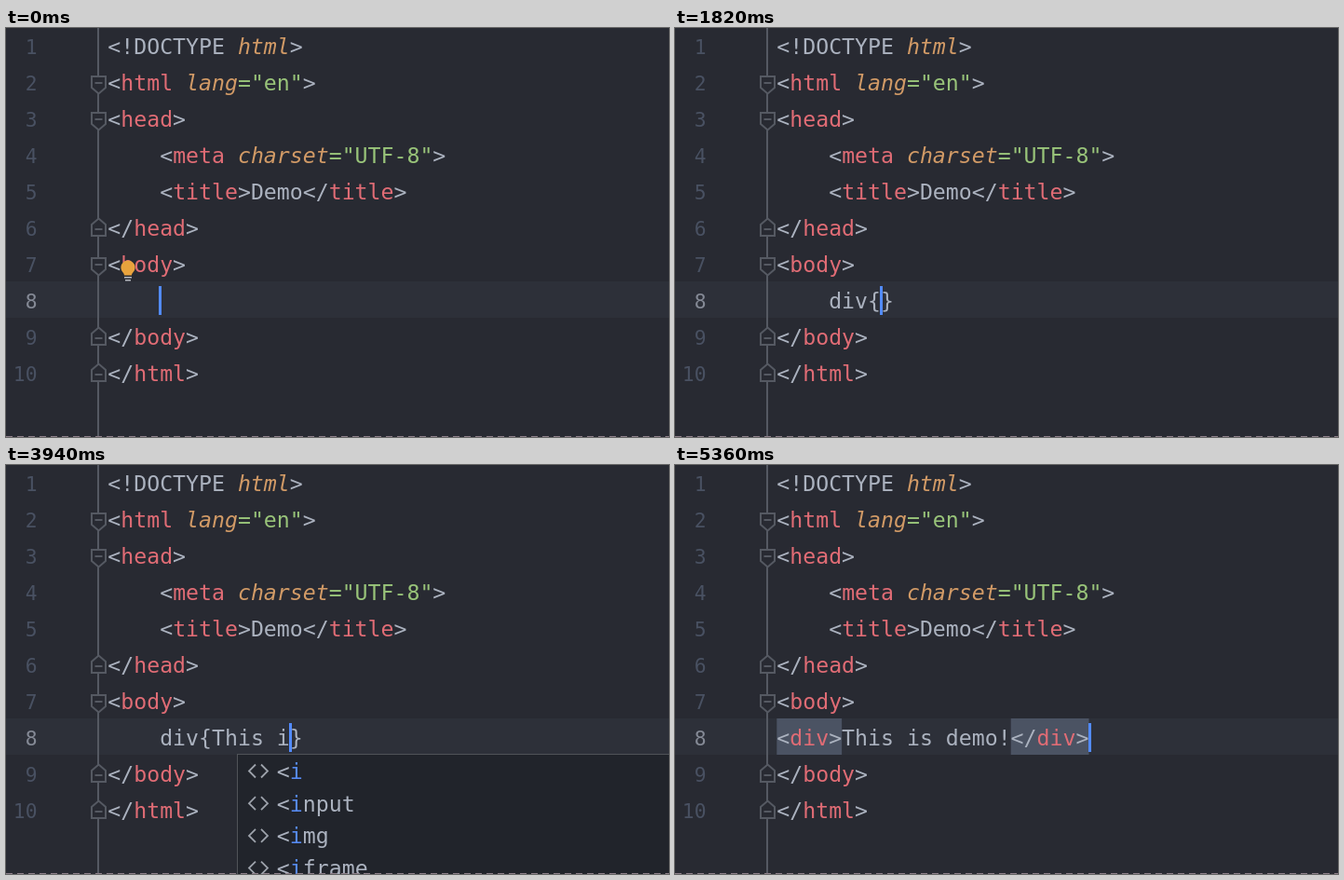
Write an HTML page that moves like this. It is 712 px wide and 439 px high and loops after 5560 ms.

```html
<!DOCTYPE html>
<html lang="en">
<head>
<meta charset="UTF-8">
<title>Editor abbreviation demo</title>
<style>
  html, body { margin: 0; width: 100%; height: 100%; overflow: hidden; background: #282a32; }
  svg { display: block; width: 712px; height: 439px; }
  text { white-space: pre; font: 23.2px "DejaVu Sans Mono", monospace; fill: #abb2bf; }
  .tag { fill: #e06c75; }
  .attr { fill: #d19a66; font-style: italic; }
  .str { fill: #98c379; }
  .key { fill: #568af2; }
  .dim { fill: #7d828c; }
  .num { font-size: 21.3px; fill: #495162; text-anchor: end; }
  .num.now { fill: #858a96; }
  .hint { font: 15.6px "Open Sans", sans-serif; fill: #5c6069; }
  .tip { fill: #5c94f5; }
  .line { fill: none; stroke: #9da2ab; stroke-width: 1.8; }
  .fold { fill: #282a32; stroke: #555962; stroke-width: 2; }
</style>
</head>
<body>
<svg id="stage" viewBox="0 0 712 439">
  <rect width="712" height="439" fill="#282a32"/>
  <rect y="272" width="712" height="39" fill="#2d3039"/>
  <path d="M99 0V439" class="fold"/>
  <g id="gutter"></g>
  <g id="code"></g>
  <g id="marks"></g>
  <text id="typed" y="301"></text>
  <g id="bulb">
    <path d="M127 265.5C127 262.5 123.4 261.500 123.400 257A7.600 7.600 0 0 1 138.600 257C138.600 261.500 135 262.500 135 265.500Z" fill="#e8a33d"/>
    <path d="M127 267.700H135M128 270.700H134" stroke="#b4b8bf" stroke-width="1.600"/>
  </g>
  <rect id="caret" y="277" width="3" height="31" fill="#528bff"/>
  <g id="popup"></g>
  <path d="M0 438.500H712" stroke="#8d7f89" stroke-width="1" stroke-dasharray="7 5"/>
</svg>
<script>
const LOOP = 5560, LEFT = 109.3, PITCH = 13.967, ROW = 39, ITEM = 34.7;
const byId = id => document.getElementById(id);
const colX = col => LEFT + col * PITCH;
const escape = s => s.replace(/&/g, "&amp;").replace(/</g, "&lt;");
const span = (cls, s) => `<tspan class="${cls}">${escape(s)}</tspan>`;
const text = (x, y, body, cls = "") => `<text x="${x}" y="${y}" class="${cls}">${body}</text>`;

// Colours tag names, attribute names and attribute values
function paint(src) {
  const parts = src.match(/<!DOCTYPE|<\/?|[\w-]+(?==)|="[^"]*"|\w+|\s+|./g);
  let inTag = false, last = "", doc = false;
  return parts.map(p => {
    let cls = "";
    if (p[0] === "<") { inTag = true; doc = p.length > 2; }
    else if (p === ">") inTag = false;
    else if (p[0] === "=") cls = "str";
    else if (inTag && p.trim()) cls = last[0] === "<" && !doc ? "tag" : "attr";
    last = p;
    return cls ? span(cls, p) : escape(p);
  }).join("");
}

const lines = [
  "<!DOCTYPE html>", '<html lang="en">', "<head>", '    <meta charset="UTF-8">',
  "    <title>Demo</title>", "</head>", "<body>", "", "</body>", "</html>"
];
const opens = [2, 3, 7], closes = [6, 9, 10];

byId("code").innerHTML = lines.map((s, i) => {
  const indent = s.length - s.trimStart().length;
  return s ? text(colX(indent), 28 + i * ROW, paint(s.trim())) : "";
}).join("");

function fold(row, dir) {
  const y = 20 + (row - 1) * ROW;
  const shape = dir > 0 ? `M92 ${y - 7}H107V${y + 5}L99.5 ${y + 11.5}L92 ${y + 5}Z`
                        : `M92 ${y + 8}H107V${y - 4}L99.5 ${y - 10.5}L92 ${y - 4}Z`;
  return `<path class="fold" d="${shape}M95.5 ${dir > 0 ? y : y + 1}h8"/>`;
}
byId("gutter").innerHTML =
  lines.map((s, i) => text(33.5, 28 + i * ROW, i + 1, i === 7 ? "num now" : "num")).join("") +
  opens.map(r => fold(r, 1)).join("") + closes.map(r => fold(r, -1)).join("");

const tagIcon = (x, y) =>
  `<path class="line" d="M${x + 20} ${y - 7}l-7 7l7 7m6 -14l7 7l-7 7"/>`;
const stampIcon = (x, y) =>
  `<path fill="#8b9099" d="M${x + 18} ${y - 9}h10v4h-3v4h8v5h-20v-5h8v-4h-3zM${x + 13} ${y + 7}h20v2.500h-20z"/>`;

// Completion list, aligned so that its words start at the given column
function popupSvg({ col, key, items, hint }) {
  const x = Math.floor(colX(col) - 42) + 0.5;
  const end = 310 + items.length * ITEM;
  let out = `<rect x="${x}" y="310.5" width="800" height="${hint ? end + 37.5 - 310 : 300}" fill="#21242b" stroke="#505358"/>`;
  items.forEach((word, i) => {
    const y = 328.5 + i * ITEM, stamp = word === "T";
    const body = (stamp ? "" : "&lt;") + span("key", key) + escape(word.slice(key.length));
    out += (stamp ? stampIcon : tagIcon)(x - 0.5, y) + text(stamp ? x + 41 : colX(col), y + 8.5, body);
    if (stamp) out += text(579, y + 8.5, "Surround with", "dim");
  });
  if (hint) {
    const y = end + 25.5;
    out += text(x + 16.5, y, "Press Enter to insert, Tab to replace", "hint") +
           text(x + 281.5, y, "Next Tip", "hint tip");
  }
  return out;
}

const list = (col, key, items, hint) => ({ col, key, items: items.split(" "), hint });
const dList = list(4, "d", "div dl datalist del", false);
const diList = list(4, "di", "div dir dialog", true);
const divList = list(4, "div", "div", true);
const tList = list(8, "T", "T", true);
const iList = list(13, "i", "i input img iframe", false);

// time, typed text with | as the caret, completion list
const steps = [
  [0, "|"], [70, ""],
  [400, "d|"], [470, "d|", dList], [540, "di|", dList],
  [610, "di|", diList], [680, "div|", diList], [750, "div|", divList],
  [1280, "div{|"], [1350, "div{}|"], [1820, "div{|}"],
  [2680, "div{T|}", tList], [2810, "div{Th|}"], [2940, "div{Thi|}"],
  [3210, "div{This|}"], [3670, "div{This |}"],
  [3870, "div{This i|}"], [3940, "div{This i|}", iList],
  [4010, "div{This is|}", iList], [4080, "div{This is|}"],
  [4220, "div{This is |}"],
  [4420, "div{This is de|}"], [4490, "div{This is demo|}"],
  [4760, "div{This is demo!|}"], [4890, "div{This is demo!}|"],
  [5160, "<div>This is demo!</div>|"], [5360, "<div>This is demo!</div>|"]
];

const mark = (from, to) =>
  `<rect x="${colX(from)}" y="272" width="${(to - from) * PITCH}" height="39" fill="#4b5363"/>`;

let shown = -1;
function draw(t) {
  const n = steps.filter(s => s[0] <= t).length - 1;
  if (n === shown) return;
  shown = n;
  const [time, raw, popup] = steps[n];
  const done = time >= 5160, start = done ? 0 : 4;
  const caretAt = raw.indexOf("|"), plain = raw.replace("|", "");
  byId("typed").setAttribute("x", colX(start));
  byId("typed").innerHTML = done ? paint(plain) : escape(plain);
  byId("caret").setAttribute("x", Math.floor(colX(start + caretAt) - 0.5));
  byId("caret").style.display = caretAt < 0 ? "none" : "";
  byId("bulb").style.display = time < 400 ? "" : "none";
  byId("popup").innerHTML = popup ? popupSvg(popup) : "";
  byId("marks").innerHTML = time >= 5360 ? mark(0, 5) + mark(18, 24)
    : done ? mark(0, 1) + mark(23, 24) : "";
}

const begin = performance.now();
function tick() {
  draw((performance.now() - begin) % LOOP);
  requestAnimationFrame(tick);
}
tick();
</script>
</body>
</html>
```
